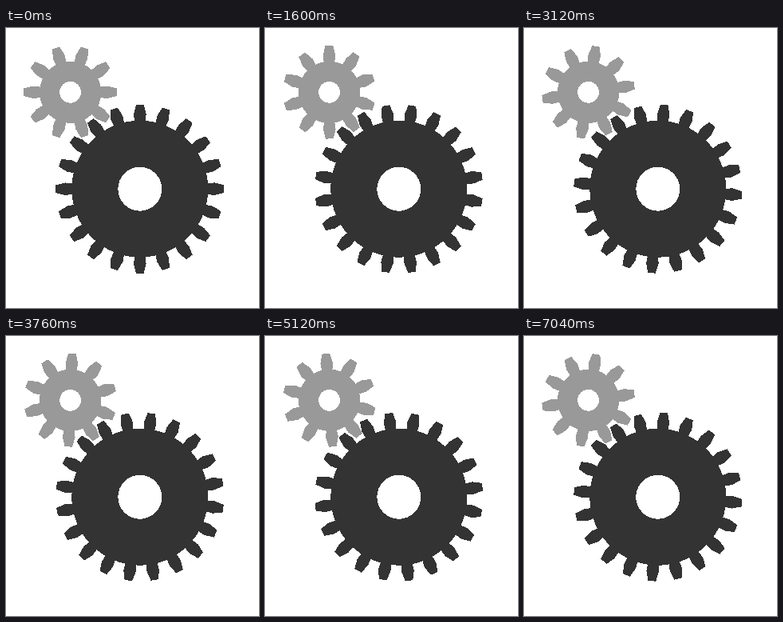
Animation of 317x350 px, one loop 7120 ms. Source, as an HTML page:

```html
<!DOCTYPE html>
<html lang="en">
<head>
<meta charset="utf-8">
<title>Gears</title>
<style>
  html, body { margin: 0; width: 100%; height: 100%; overflow: hidden; background: #fff; }
  svg { display: block; width: 317px; height: 350px; shape-rendering: crispEdges; }
</style>
</head>
<body>
<svg viewBox="0 0 317 350"></svg>
<script>
const LOOP = 7120, STEP = 80;
const svg = document.querySelector('svg');

function add(parent, tag, attrs) {
  const el = document.createElementNS('http://www.w3.org/2000/svg', tag);
  for (const k in attrs) el.setAttribute(k, attrs[k]);
  return parent.appendChild(el);
}

// turns: full rotations per loop, positive is clockwise
function gear({ x, y, tip, body, hole, teeth, fill, turns }) {
  const g = add(svg, 'g', { fill });
  const tooth = `M-6.5 ${3 - body}L-6.8 ${-body}L-7.8 ${12 - tip}L-4.8 ${-tip}` +
    `H4.8L7.8 ${12 - tip}L6.8 ${-body}L6.5 ${3 - body}Z`;
  for (let i = 0; i < teeth; i++)
    add(g, 'path', { d: tooth, transform: `rotate(${90 + i * 360 / teeth})` });
  add(g, 'circle', { r: body });
  add(g, 'circle', { r: hole, fill: '#fff' });
  return p => g.setAttribute('transform', `translate(${x} ${y}) rotate(${p * turns * 360})`);
}

const gears = [
  gear({ x: 80.6, y: 80.3, tip: 58.2, body: 38.7, hole: 13.4, teeth: 10, fill: '#999', turns: 2 }),
  gear({ x: 167.8, y: 201.2, tip: 105.4, body: 85.5, hole: 27.5, teeth: 20, fill: '#333', turns: -1 })
];

function draw() {
  const t = Math.floor(performance.now() % LOOP / STEP) * STEP;
  gears.forEach(turn => turn(t / LOOP));
  requestAnimationFrame(draw);
}
draw();
</script>
</body>
</html>
```
